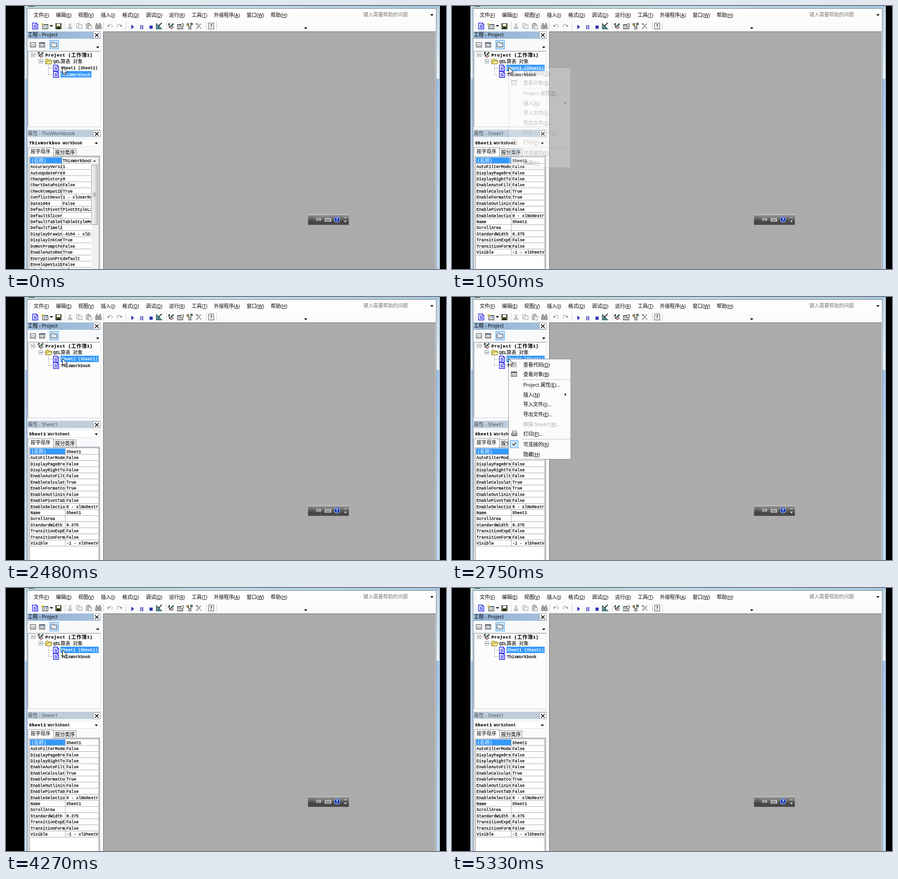
Animation of 969x578 px, one loop 5.73 s. Source, as an HTML page with a canvas:

```html
<!DOCTYPE html>
<html lang="zh-CN">
<head>
<meta charset="utf-8">
<title>Project editor</title>
<style>
html, body { margin: 0; width: 100%; height: 100%; overflow: hidden; background: #000; }
canvas { display: block; }
</style>
</head>
<body>
<canvas id="stage" width="969" height="578"></canvas>
<script>
const LOOP = 5730;
const stage = document.getElementById('stage');
const layer = document.createElement('canvas');
layer.width = 969;
layer.height = 578;
const main = stage.getContext('2d');
const popup = layer.getContext('2d');
let g = main;

const UI = '"Open Sans", "Noto Sans CJK SC", "Noto Sans CJK", sans-serif';
const MONO = '"Liberation Mono", "Noto Sans CJK SC", monospace';
const BLUE = '#3399ff';

// time, menu opacity, vertical shift, optional pointer position
const steps = [
  [0, 0, 0], [380, 0, 0], [500, .55, 0], [650, 1, 0],
  [1050, .25, 0], [1170, .75, 0], [1310, 1, 0],
  [1680, .55, 0], [1800, 1, 0],
  [2480, 0, 1], [2600, .55, 1], [2750, 1, 1],
  [3460, .55, 1], [3580, 1, 1],
  [4270, 0, 2], [4390, .55, 2], [4540, 1, 2],
  [4940, 0, 2, 236, 170], [5060, 0, 2, 530, 380],
  [5180, 0, 2, 822, 560], [5330, 0, 2, -50, -50]
];

const bookRows = [
  ['(名称)', 'ThisWorkbook'], ['AccuracyVersi', '1'], ['AutoUpdateFre', '0'],
  ['ChangeHistory', '0'], ['ChartDataPoin', 'False'], ['CheckCompatib', 'True'],
  ['ConflictResol', '1 - xlUserRes'], ['Date1904', 'False'],
  ['DefaultPivotT', 'PivotStyleLig'], ['DefaultSlicer', ''],
  ['DefaultTableS', 'TableStyleMed'], ['DefaultTimeli', ''],
  ['DisplayDrawin', '-4104 - xlDis'], ['DisplayInkCom', 'True'],
  ['DoNotPromptFo', 'False'], ['EnableAutoRec', 'True'],
  ['EncryptionPro', 'default'], ['EnvelopeVisib', 'False'], ['Final', 'False']
];
const sheetRows = [
  ['(名称)', 'Sheet1'], ['AutoFilterMode', 'False'], ['DisplayPageBre', 'False'],
  ['DisplayRightTo', 'False'], ['EnableAutoFilt', 'False'], ['EnableCalculat', 'True'],
  ['EnableFormatCo', 'True'], ['EnableOutlinin', 'False'], ['EnablePivotTab', 'False'],
  ['EnableSelectio', '0 - xlNoRestri'], ['Name', 'Sheet1'], ['ScrollArea', ''],
  ['StandardWidth', '8.375'], ['TransitionExpE', 'False'],
  ['TransitionForm', 'False'], ['Visible', '-1 - xlSheetVi']
];

function rect(x, y, w, h, c) {
  g.fillStyle = c;
  g.fillRect(x, y, w, h);
}
function box(x, y, w, h, fill, edge) {
  rect(x, y, w, h, edge);
  rect(x + 1, y + 1, w - 2, h - 2, fill);
}
function path(pts, fill, edge, width = 1) {
  g.beginPath();
  for (let i = 0; i < pts.length; i += 2) g.lineTo(pts[i], pts[i + 1]);
  if (fill) {
    g.closePath();
    g.fillStyle = fill;
    g.fill();
  }
  if (edge) {
    g.strokeStyle = edge;
    g.lineWidth = width;
    g.stroke();
  }
}
function ring(x, y, r, c, from = 0, to = Math.PI * 2) {
  g.beginPath();
  g.arc(x, y, r, from, to);
  g.strokeStyle = c;
  g.lineWidth = 1.2;
  g.stroke();
}
function fade(x0, y0, x1, y1, ...colors) {
  const f = g.createLinearGradient(x0, y0, x1, y1);
  colors.forEach((c, i) => f.addColorStop(i / (colors.length - 1), c));
  return f;
}
function at(x, y, draw) {
  g.save();
  g.translate(x, y);
  draw();
  g.restore();
}
function dots(x, y, n, dx, dy, c) {
  for (let i = 0; i < n; i++) rect(x + i * dx, y + i * dy, 1, 1, c);
}
function down(x, y, c = '#000') {
  path([x - 3.5, y - 2, x + 3.5, y - 2, x, y + 2], c);
}

// Interface text; an underlined access key follows every "("
function label(s, x, cy, color = '#000', key = false) {
  g.font = '10.9px ' + UI;
  g.fillStyle = color;
  g.fillText(s, x, cy + 4);
  const k = s.indexOf('(') + 1;
  if (key && k) {
    const left = x + g.measureText(s.slice(0, k)).width;
    rect(left, Math.round(cy + 5), g.measureText(s[k]).width, 1, color);
  }
}
// Fixed-pitch text with larger ideographs and slightly heavier strokes
function mono(s, x, cy, color = '#000', bold = false) {
  g.fillStyle = g.strokeStyle = color;
  g.lineWidth = .3;
  g.letterSpacing = bold ? '0.88px' : '0px';
  for (const run of s.match(/[\u3000-\u9fff]+|[^\u3000-\u9fff]+/g) || []) {
    const wide = run.charCodeAt(0) > 0x3000;
    const y = cy + (wide ? 4 : 3.2);
    g.font = (bold ? 'bold ' : '') + (wide ? 10.8 : 9) + 'px ' + MONO;
    g.fillText(run, x, y);
    if (!wide) g.strokeText(run, x, y);
    x += g.measureText(run).width;
  }
  g.letterSpacing = '0px';
}
function cell(s, x, cy, right, color) {
  g.save();
  g.beginPath();
  g.rect(x - 2, cy - 8, right - x + 2, 16);
  g.clip();
  mono(s, x, cy, color);
  g.restore();
}

function docIcon(x, y) {
  at(x, y, () => {
    path([-5.5, -6.5, 3, -6.5, 6, -3.5, 6, 6.5, -5.5, 6.5, -5.5, -6.5], '#fff', '#1414e6', 1.4);
    path([2.5, -6, 2.5, -3, 6, -3], null, '#1414e6');
    for (const row of [-3, -1, 1, 3]) rect(-3, row, row < -2 ? 4 : 7, 1, '#1414e6');
  });
}
function formIcon(x, y, edge = '#333', bar = '#7a96b8') {
  box(x - 6, y - 5, 13, 11, '#fff', edge);
  rect(x - 5, y - 4, 11, 2, bar);
  for (const dy of [0, 3]) {
    rect(x - 4, y + dy, 4, 1, edge);
    rect(x + 1, y + dy, 4, 1, edge);
  }
}
function projectIcon(x, y) {
  at(x, y, () => {
    path([-6, -3, -2, 0, -4, 4], null, '#222', 1.5);
    path([0, -1, 5, -6, 6, -3, 2, 1], '#2a8c8c', '#222');
    path([-3, 2, 3, 0, 6, 3, 1, 6], '#d8d8d8', '#222');
    rect(-5, -6, 3, 3, '#222');
    rect(-2, 3, 3, 2, '#c8463c');
    rect(3, -2, 2, 2, '#d7b52e');
  });
}
function folder(x, y, fill, edge) {
  path([x - 6.5, y + 5, x - 6.5, y - 4, x - 5, y - 5.5, x - 1, y - 5.5, x, y - 3.5,
    x + 6.5, y - 3.5, x + 6.5, y + 5, x - 6.5, y + 5], fill, edge);
}
function closeButton(y) {
  box(192, y, 16, 15, '#fff', '#8b949c');
  path([196, y + 4, 204, y + 12], null, '#000', 1.7);
  path([204, y + 4, 196, y + 12], null, '#000', 1.7);
}
function helpMark(x, y, size, color) {
  g.font = 'bold ' + size + 'px ' + UI;
  g.fillStyle = color;
  g.textAlign = 'center';
  g.fillText('?', x, y);
  g.textAlign = 'left';
}

function drawFrame() {
  rect(0, 0, 969, 578, '#000');
  // glass border: a pale sheen that ends sharply, then blue
  rect(40, 0, 916, 160, fade(0, 0, 0, 160, '#bcd2e2', '#cfe0ed', '#e6f0f8'));
  rect(40, 160, 916, 418, fade(0, 160, 0, 578, '#9cc0e6', '#adcbea', '#bdd6ee', '#bdd6ee'));
  rect(40, 0, 1, 578, '#4a555f');
  rect(41, 0, 1, 578, '#e4f0fa');
  rect(954, 0, 1, 578, '#e4f4fa');
  rect(955, 0, 1, 578, '#4a555f');
  rect(42, 0, 912, 5, fade(42, 0, 954, 0, '#b7d3cf', '#c4dce6', '#a9c8df'));
  rect(50, 0, 12, 1, '#000');
  rect(46, 5, 902, 573, '#6f7f8e');
  rect(47, 6, 900, 572, '#f8f9fa');
  rect(47, 6, 900, 49, fade(0, 6, 0, 55, '#ffffff', '#f8f9fa'));
  rect(214, 56, 733, 522, '#696969');
  rect(215, 57, 731, 521, '#ababab');
  rect(946, 56, 1, 522, '#f4f4f4');
}

function drawBars() {
  for (const y of [13, 37]) dots(52, y, 7, 0, 2, '#b2b8be');
  const names = ['文件(F)', '编辑(E)', '视图(V)', '插入(I)', '格式(O)', '调试(D)',
    '运行(R)', '工具(T)', '外接程序(A)', '窗口(W)', '帮助(H)'];
  const lefts = [61, 110, 159, 209, 256, 308, 359, 409, 458, 530, 583];
  names.forEach((s, i) => label(s, lefts[i], 19.5, '#000', true));
  label('键入需要帮助的问题', 787, 18.5, '#777');
  down(938, 20);
  down(660, 49);

  for (const x of [130, 214, 264, 353, 441, 463]) rect(x, 35, 1, 18, '#c9cdd1');
  docIcon(64, 44);
  formIcon(86, 45);
  rect(78, 38, 5, 4, '#e2c33c');
  down(100, 44);
  box(109, 38, 13, 13, '#6d7a3a', '#222');
  rect(112, 39, 7, 5, '#fff');
  rect(112, 46, 7, 4, '#222');

  const dim = '#9a9a9a';
  path([138, 38, 143, 47], null, dim, 1.2);
  path([144, 38, 139, 47], null, dim, 1.2);
  ring(138.5, 48.5, 1.8, dim);
  ring(143.5, 48.5, 1.8, dim);
  box(155, 38, 8, 10, '#f5f5f5', dim);
  box(159, 41, 9, 9, '#f5f5f5', dim);
  box(176, 39, 11, 11, '#c4c4c4', dim);
  rect(179, 37, 5, 3, dim);
  box(181, 43, 8, 8, '#f5f5f5', dim);
  for (const x of [197, 204]) {
    path([x, 50, x, 45, x + 2, 38, x + 4, 38, x + 6, 45, x + 6, 50], '#a8a8a8', '#7d7d7d');
  }
  rect(201, 42, 4, 3, '#888');
  ring(230, 44, 4, dim, Math.PI, Math.PI * 2.3);
  path([223, 42, 229, 42, 225, 47], dim);
  ring(249, 44, 4, dim, Math.PI * .7, Math.PI * 2);
  path([256, 42, 250, 42, 254, 47], dim);

  const navy = '#3434b4';
  path([276, 41, 276, 51, 282, 46], navy);
  rect(296, 42, 2, 9, navy);
  rect(300, 42, 2, 9, navy);
  rect(316, 43, 7, 7, navy);
  path([331, 38, 331, 48, 341, 48], '#5fa8a8', '#222');
  path([335, 45, 343, 37], null, '#222', 1.8);
  rect(330, 49, 14, 2, '#1b6e6e');
  projectIcon(363, 44);
  formIcon(383, 45);
  path([383, 44, 387, 39, 391, 39, 391, 43, 386, 46], '#f1ead8', '#333');
  box(398, 38, 5, 5, '#e3c643', '#333');
  box(406, 37, 5, 5, '#50a5a5', '#333');
  path([401, 43, 405, 46, 408, 42], null, '#333');
  box(402, 45, 6, 6, '#d4d4d4', '#333');
  path([419, 50, 429, 39], null, '#8a8a8a', 2);
  path([420, 39, 430, 50], null, '#aaa', 2);
  rect(418, 38, 5, 3, '#8a8a8a');
  box(446, 37, 12, 14, '#fff', '#444');
  helpMark(452, 48, 10, '#222');
}

function drawProject(picked) {
  rect(48, 56, 160, 16, fade(48, 0, 208, 0, '#93b1d2', '#a5c0dc'));
  label('工程 - Project', 48, 63, '#000');
  closeButton(56);
  formIcon(59, 85, '#444', '#dfe6ee');
  formIcon(79, 85, '#333', '#4f6f94');
  box(96, 75, 20, 20, '#cfe5f8', BLUE);
  folder(105.5, 85, '#dce8f2', '#333');
  down(202, 91);
  box(48, 99, 160, 167, '#fcfcfc', '#7e858c');
  rect(207, 100, 1, 166, '#e2e5e8');
  rect(48, 265, 160, 1, '#c7ccd1');

  dots(64, 107, 3, 2, 0, '#888');
  dots(76, 113, 3, 0, 2, '#888');
  dots(81, 121, 3, 2, 0, '#888');
  dots(93, 128, 12, 0, 2, '#888');
  for (const y of [136, 150]) dots(94, y, 5, 2, 0, '#888');
  for (const [x, y] of [[55, 103], [72, 117]]) {
    box(x, y, 9, 9, '#fff', '#8c9aaa');
    rect(x + 2, y + 4, 5, 1, '#222');
  }
  projectIcon(76, 107);
  mono('Project (工作簿1)', 87, 107.5, '#000', true);
  folder(93.5, 122, '#e8d76a', '#8a7a26');
  path([88, 127, 91, 121, 102, 121, 99, 127], '#f8ef9c', '#8a7a26');
  mono('QEL算表 对象', 104, 122);
  docIcon(110, 136.5);
  docIcon(110, 150.5);
  if (picked) rect(120, 129, 84, 14, BLUE);
  else rect(120, 143, 68, 14, BLUE);
  mono('Sheet1 (Sheet1)', 121, 136, picked ? '#fff' : '#000');
  mono('ThisWorkbook', 121, 150.5, picked ? '#000' : '#fff');
}

function drawScroll() {
  rect(188, 333, 15, 245, '#f0f0f0');
  path([192, 342, 198, 342, 195, 338.5], '#444');
  box(188, 349, 14, 132, fade(188, 0, 202, 0, '#f5f5f5', '#e4e4e4', '#c8c8c8'), '#949494');
  for (let i = 0; i < 3; i++) rect(192, 411 + i * 3, 6, 1, '#666');
}

function drawProperties(sheet) {
  rect(48, 272, 160, 16, '#bfcddb');
  label('属性 - ' + (sheet ? 'Sheet1' : 'ThisWorkbook'), 48, 279.5, '#434e5a');
  closeButton(273);
  box(48, 292, 159, 17, '#fff', '#e0e3e6');
  mono(sheet ? 'Sheet1' : 'ThisWorkboo', 51, 301, '#000', true);
  mono(sheet ? 'Worksheet' : 'Workbook', sheet ? 92 : 125, 301);
  down(199, 302);

  box(48, 329, 159, 260, '#fff', '#8c9299');
  box(104, 313, 51, 17, '#f0f0f0', '#8c9299');
  box(48, 311, 57, 19, '#fff', '#8c9299');
  rect(49, 328, 55, 3, '#fff');
  label('按字母序', 54, 320);
  label('按分类序', 108, 321.5);

  box(51, 331, 154, 260, '#fff', '#70777e');
  const rows = sheet ? sheetRows : bookRows;
  const mid = sheet ? 130 : 123;
  const right = sheet ? 203 : 187;
  rect(53, 333, mid - 53, 13, BLUE);
  rows.forEach(([name, value], i) => {
    const cy = 339.5 + 13.43 * i;
    cell(name, i ? 54 : 56, cy, mid, i ? '#000' : '#fff');
    cell(value, sheet ? 133 : 125, cy, right);
    rect(53, cy + 6, right - 53, 1, '#a4a4a4');
  });
  rect(mid, 333, 1, Math.min(245, 13.43 * rows.length), '#a4a4a4');
  if (!sheet) drawScroll();
}

function drawLanguageBar() {
  rect(665, 458, 90, 23, fade(0, 458, 0, 481, '#a2a2a2', '#747474', '#484848', '#484848'));
  rect(665, 458, 90, 1, '#dcdcdc');
  for (let i = 0; i < 3; i++) dots(669 + i * 3, 463, 5, 0, 3, '#1e1e1e');
  mono('CH', 683, 469, '#fff');
  box(702, 466, 14, 8, '#aaa', '#d8d8d8');
  for (const y of [468, 470]) dots(704, y, 5, 2, 0, '#555');
  rect(706, 472, 6, 1, '#555');
  g.beginPath();
  g.arc(729, 469, 6.5, 0, 7);
  g.fillStyle = '#1738b4';
  g.fill();
  ring(729, 469, 6, '#a9bcf0');
  helpMark(729, 473, 10, '#fff');
  rect(745, 465, 5, 1, '#fff');
  path([744.5, 472, 750.5, 472, 747.5, 475], '#fff');
}

function drawMenu() {
  box(124, 135, 138, 221, '#fbfbfb', '#8d9297');
  const items = ['查看代码(O)', '查看对象(B)', 'Project 属性(E)...', '插入(N)', '导入文件(I)...',
    '导出文件(E)...', '移除 Sheet1(R)...', '打印(P)...', '可连接的(K)', '隐藏(H)'];
  let y = 147.5;
  items.forEach((s, i) => {
    label(s, 157, y, i === 6 ? '#a5a5a5' : '#000', true);
    const split = i === 1 || i === 7;
    if (split) rect(154, Math.round(y + 11), 107, 1, '#bfc3c7');
    y += split ? 23 : 21.6;
  });
  path([248.5, 210, 248.5, 216.5, 252, 213.2], '#000');
  box(131, 142, 11, 11, '#fff', '#777');
  for (let i = 0; i < 3; i++) rect(133, 145 + i * 2, 7, 1, '#777');
  formIcon(136, 168, '#333', '#555');
  box(133, 293, 9, 6, '#fff', '#444');
  path([131, 298, 143, 298, 143, 304, 131, 304], '#bcbcbc', '#444');
  rect(133, 302, 8, 1, '#444');
  box(128, 314, 18, 17, '#cfe5f8', BLUE);
  path([133, 322, 136, 325, 141, 319], null, '#222', 1.5);
}

function drawPointer(x, y) {
  at(x + .5, y + .5, () => path([0, 0, 0, 15, 3.4, 11.8, 5.8, 17, 8.2, 16, 5.9, 11,
    10.8, 11, 0, 0], '#fff', '#000'));
}

function render(t) {
  const [, alpha, shift, x = 124, y = 134 + shift] = steps.findLast(s => s[0] <= t);
  drawFrame();
  drawBars();
  drawProject(t >= 380);
  drawProperties(t >= 650);
  drawLanguageBar();
  if (alpha) {
    main.globalAlpha = alpha;
    main.drawImage(layer, 0, shift);
    main.globalAlpha = 1;
  }
  drawPointer(x, y);
}

g = popup;
drawMenu();
g = main;

const start = performance.now();
function tick() {
  render((performance.now() - start) % LOOP);
  requestAnimationFrame(tick);
}
tick();
</script>
</body>
</html>
```
